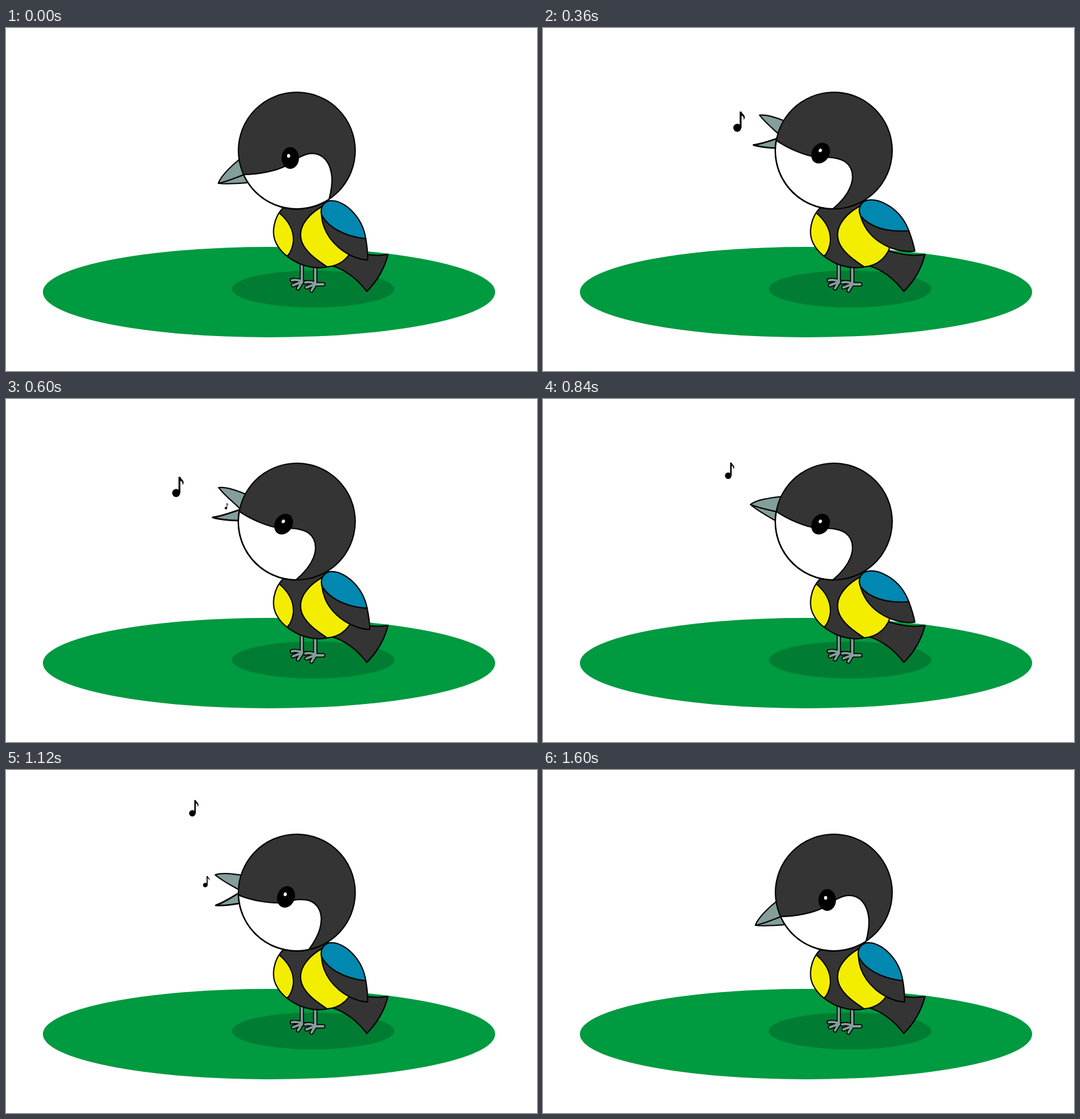
Recreate the animation shown at these times as an HTML page. Size 850 by 550 pixels, loop 1.64 s.

```html
<!DOCTYPE html>
<html lang="en">
<head>
<meta charset="utf-8">
<title>Singing bird</title>
<style>
  html, body { margin: 0; width: 100%; height: 100%; overflow: hidden; background: #fff; }
  svg { display: block; width: 100vw; height: 100vh; }
  .line { stroke: #000; stroke-width: 2; stroke-linejoin: round; stroke-linecap: round; }
  .dark { fill: #343434; }
  .grey { fill: #839e9b; }
  .yellow { fill: #f3ee00; }
  .none { fill: none; }
  .limb { fill: none; stroke-linecap: round; stroke-linejoin: round; }
  .rim { stroke: #000; stroke-width: 7; }
  .skin { stroke: #839e9b; stroke-width: 3.8; }
</style>
</head>
<body>
<svg viewBox="0 0 850 550">
  <defs>
    <path id="torso" d="M445,287 C428,303 424,330 433,346 C440,360 455,371 470,378 C485,384 500,386 514,383
      C535,381 549,369 556,350 C553,318 535,288 515,277 Z"/>
    <clipPath id="inTorso"><use href="#torso"/></clipPath>
    <path id="leg" d="M495,376 V410 C489,407 484,407 479,408 M494,411 L481,416 M495,411 L489,421 M495,411 H508"/>
    <g id="note">
      <circle r="6.4"/>
      <path d="M3.8,0 V-26 H6.8 C7.5,-22 12,-21 12,-17 C12,-15 11,-13.5 10,-13 C11,-17 9,-19 6.8,-19.5 V0 Z"/>
    </g>
  </defs>

  <ellipse cx="421" cy="423.5" rx="362" ry="72.5" fill="#009a40"/>
  <ellipse cx="491.5" cy="418.5" rx="130" ry="29.5" fill="#007d32"/>

  <path id="tail" class="dark line" d="M520,372 L535,350 C560,362 590,367 611.5,363
    C606,385 595,405 577.5,422.5 C562,402 545,388 521,381 Z"/>

  <g class="limb">
    <g transform="translate(-21.5 -3.5)">
      <use href="#leg" class="rim"/>
      <use href="#leg" class="skin"/>
    </g>
    <use href="#leg" class="rim"/>
    <use href="#leg" class="skin"/>
  </g>

  <use href="#torso" class="dark"/>
  <g clip-path="url(#inTorso)">
    <path class="yellow line" d="M438,297 C452,309 461,325 460,342 C459,352 456,359 451,365 L415,370 V290 Z"/>
    <path class="yellow line" d="M510,284 C480,300 462,325 477,350 C487,366 503,375 514,383 L570,395 V290 Z"/>
  </g>
  <use href="#torso" class="line none"/>

  <g id="head">
    <path id="lower" class="grey line" d="M340,249 C355,246 370,239 381,235 L393,231 L398,247 C375,249 355,251 340,249 Z"/>
    <path id="upper" class="grey line" d="M340,249 C343,239 358,223 377,208 L393,231 L381,235 C370,239 355,246 340,249 Z"/>
    <circle class="dark" cx="465.5" cy="196.5" r="93.5"/>
    <path class="line" fill="#fff" d="M380,235 C405,235 432,229 448,221 C458,216 472,202 490,201
      C514,202 530,228 517,275 A93.5,93.5 0 0 1 380,235 Z"/>
    <circle class="line none" cx="465.5" cy="196.5" r="93.5"/>
  </g>
  <g id="eye">
    <ellipse rx="14" ry="17.5"/>
    <ellipse cx="-2.6" cy="-3.5" rx="2.5" ry="3" fill="#fff"/>
  </g>

  <g id="wing">
    <path class="dark" d="M505,299 C502,284 513,276 522,277 C540,277 570,300 576,338
      C578,350 579,361 579,372 C552,371 508,345 505,299 Z"/>
    <path class="line" fill="#0088b0" d="M505,299 C502,284 513,276 522,277 C540,277 570,300 576,338 C540,334 514,318 505,299 Z"/>
    <path class="line none" d="M576,338 C578,350 579,361 579,372 C552,371 508,345 505,299"/>
  </g>

  <g id="notes"></g>
</svg>

<script>
const STEP = 40, FRAMES = 41;
const TILT = 34.3, FLAP = 13.8, WAG = 9;
const BEAT = 12;        // steps per wing flap or tail wag
const OPEN = 6;         // steps the beak stays open
const LIFE = 15, DRIFT = 10;
const BUD = .31;        // scale of a new note

// A note grows from the beak to a turning point, then drifts on and slows down.
const notes = [
  { start: 4, rise: 5, size: 1, from: [362, 190], turn: [311, 160], drift: [-46, -11] },
  { start: 15, rise: 6, size: .81, from: [352, 175], turn: [296.5, 123], drift: [2, -59] },
  { start: 25, rise: 6, size: .81, from: [345, 206], turn: [293, 163], drift: [2, -59] }
];

const el = id => document.getElementById(id);
const move = (node, value) => node.setAttribute('transform', value);
const clamp = v => Math.max(0, Math.min(1, v));
const mix = (a, b, k) => a + (b - a) * k;
const easeOut = u => 1 - (1 - u) ** 2;
const swing = f => 1 - Math.abs(2 * (f % BEAT) / BEAT - 1);

const [head, eye, upper, lower, wing, tail] =
  ['head', 'eye', 'upper', 'lower', 'wing', 'tail'].map(el);

for (const note of notes) {
  note.node = document.createElementNS('http://www.w3.org/2000/svg', 'use');
  note.node.setAttribute('href', '#note');
  el('notes').append(note.node);
}

function drawHead(f) {
  const rot = TILT * clamp(Math.min(f / 6, (35 - f) / 11));
  move(head, `rotate(${rot} 465.5 196.5)`);
  move(eye, `translate(${455 - .31 * rot} ${208.5 - .23 * rot}) rotate(${rot * .9})`);
}

// The open beak slides back a little while a note leaves it.
function drawBeak(f) {
  const song = notes.find(n => f >= n.start && f < n.start + OPEN);
  if (!song) return [upper, lower].forEach(part => move(part, ''));
  const k = (f - song.start) / OPEN;
  const x = mix(331.5, 336, k), y = mix(222, 215.5, k);
  move(upper, `translate(${x} ${y}) rotate(29.5) translate(-340 -249)`);
  move(lower, `translate(${x + 18.7} ${y + 45.1}) rotate(-26) scale(1 1.3) translate(-340 -249)`);
}

function drawNote(note, f) {
  const age = f - note.start;
  const on = age >= 0 && age < LIFE;
  note.node.style.display = on ? '' : 'none';
  if (!on) return;
  const grow = clamp(age / note.rise);
  const glide = easeOut(clamp((age - note.rise) / DRIFT));
  const [x, y] = [0, 1].map(i => mix(note.from[i], note.turn[i], grow) + note.drift[i] * glide);
  move(note.node, `translate(${x} ${y}) scale(${mix(BUD, note.size, grow)})`);
}

function draw(f) {
  drawHead(f);
  drawBeak(f);
  const flap = f >= 4 && f <= 28 ? swing(f - 4) : 0;
  const wag = f >= 28 ? swing(f - 28) : 0;
  move(wing, `rotate(${-FLAP * flap} 516 284)`);
  move(tail, `rotate(${-WAG * wag} 520 370)`);
  notes.forEach(note => drawNote(note, f));
}

const start = performance.now();
function tick() {
  draw(Math.floor((performance.now() - start) / STEP) % FRAMES);
  requestAnimationFrame(tick);
}
draw(0);
requestAnimationFrame(tick);
</script>
</body>
</html>
```
